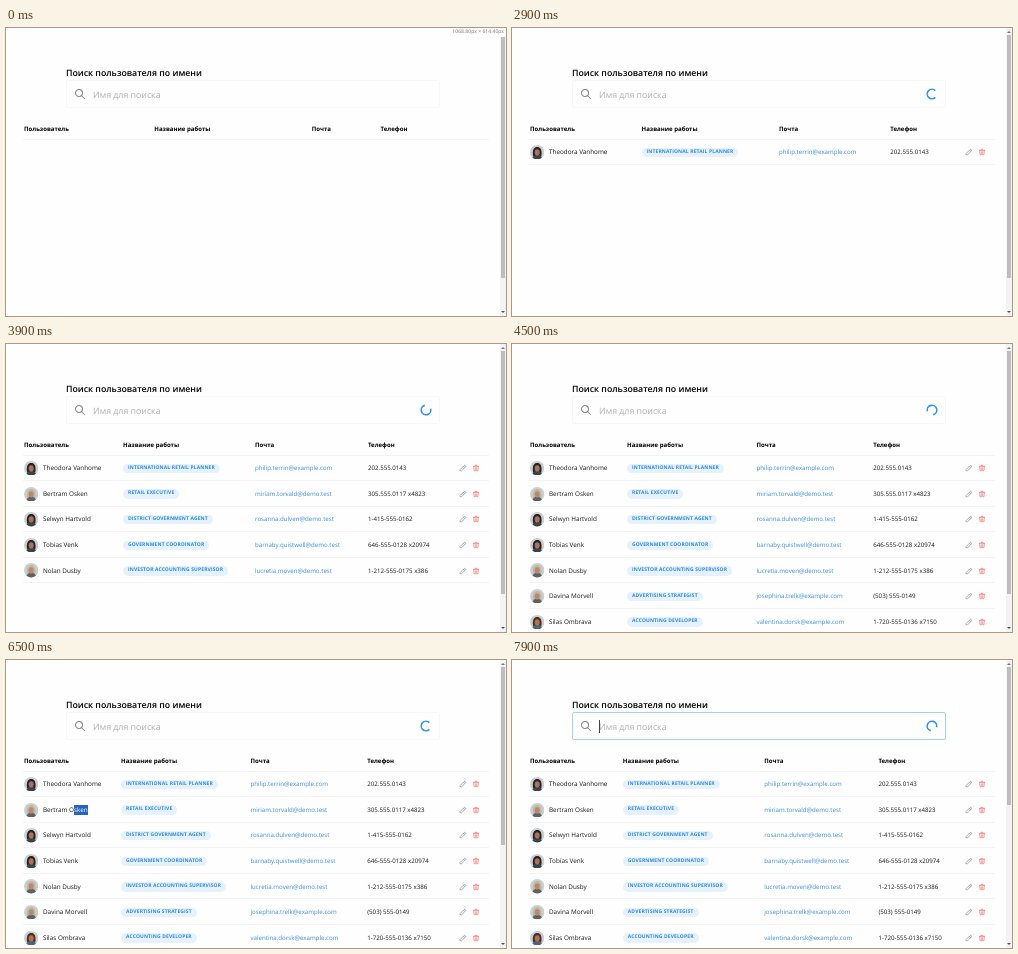
Recreate the animation shown at these times as an HTML page. Size 500 px wide and 288 px high, loop 8 s.

```html
<!DOCTYPE html>
<html lang="ru">
<head>
<meta charset="utf-8">
<title>Поиск пользователя</title>
<style>
  html, body { margin: 0; width: 100%; height: 100%; overflow: hidden; background: #fefefe; }
  #stage {
    position: relative; width: 500px; height: 288px; overflow: hidden;
    font: 6.15px/10px "Open Sans", "Noto Sans", sans-serif;
    color: #15181b; text-rendering: geometricPrecision; white-space: nowrap;
  }
  #stage div, #stage svg, .cell { position: absolute; box-sizing: border-box; }
  svg { fill: none; stroke-linecap: round; stroke-linejoin: round; }

  #title { left: 60px; top: 38px; font-size: 8.77px; line-height: 14px; font-weight: 600; color: #000; }
  #field { left: 60px; top: 52px; width: 374px; height: 28px; border: 1px solid #f6f7f8; border-radius: 2px; }
  #field.focus { border-color: #a5d2f2; }
  #hint { left: 87px; top: 59.5px; font-size: 8.8px; line-height: 14px; color: #afb1b4; }
  #caret { left: 87px; top: 60px; width: 1px; height: 13px; background: #444; }
  #search { left: 67.5px; top: 60px; width: 12px; height: 12px; stroke: #868a8e; stroke-width: 2.1; }
  #spinner { left: 414px; top: 60px; width: 12px; height: 12px; stroke: #2f92e8; stroke-width: 1.6; stroke-linecap: butt; }

  #table { left: 0; top: 0; }
  .row { left: 17px; width: 466px; height: 25.6px; border-bottom: 1px solid #f3f3f5; }
  .row .cell { top: 7.8px; }
  .head { top: 95.5px; height: 16px; font-weight: 700; font-size: 6.05px; color: #000; }
  .head .cell { top: 0; }
  .user { left: 1px; }
  .job { left: calc(var(--job) - 17px); }
  .mail { left: calc(var(--mail) - 17px); }
  .phone { left: calc(var(--phone) - 17px); }
  .body .user { left: 20px; font-weight: 500; font-size: 6.35px; }
  .body .mail { color: #3b8fdc; }
  .body .job {
    top: 8.4px; padding: 0 5px; border-radius: 5px; background: #e5f2fd; color: #2f8ae0;
    font-size: 5px; line-height: 9.5px; font-weight: 700; letter-spacing: .12px;
  }
  .avatar { left: .8px; top: 5.6px; width: 14.4px; height: 14.4px; }
  .pen, .bin { top: 8.8px; width: 8px; height: 8px; stroke-width: 2; }
  .pen { left: 435.5px; stroke: #868e96; }
  .bin { left: 448.5px; stroke: #f4726f; }
  mark { display: inline-block; background: #2563c4; color: #fff; line-height: 10px; }

  #track { left: 494px; top: 0; width: 6px; height: 288px; background: #f3f3f3; }
  #thumb { left: .7px; top: 7px; width: 4.6px; background: #bdbdbd; }
  .arrow { left: 1.4px; border: 2px solid transparent; }
  .up { top: 1px; border-bottom-color: #777 !important; }
  .down { bottom: 1px; border-top-color: #555 !important; }
  #size {
    right: 0; top: 0; width: 55px; height: 9px; padding-right: 2px; background: #fefefe;
    font-size: 5.1px; line-height: 9px; text-align: right; color: #777;
  }
</style>
</head>
<body>
<div id="stage">
  <div id="title">Поиск пользователя по имени</div>
  <div id="field"></div>
  <svg id="search" viewBox="0 0 24 24"><circle cx="10" cy="10" r="7"/><path d="M21 21l-6-6"/></svg>
  <div id="hint">Имя для поиска</div>
  <div id="caret"></div>
  <svg id="spinner" viewBox="-6 -6 12 12"><path d="M-3.400 -3.400A4.800 4.800 0 1 1 -3.400 3.400"/></svg>
  <div id="table">
    <div class="row head">
      <span class="cell user">Пользователь</span><span class="cell job">Название работы</span>
      <span class="cell mail">Почта</span><span class="cell phone">Телефон</span>
    </div>
  </div>
  <div id="track"><div class="arrow up"></div><div id="thumb"></div><div class="arrow down"></div></div>
  <div id="size">1068.80px × 614.40px</div>
</div>
<script>
const LOOP = 8000, TICK = 100;
const SPIN_START = 2300, SPIN_PERIOD = 1200;
const FIRST_ROW = 2700, ROW_PERIOD = 300;
const TABLE_TOP = 111.4, ROW_HEIGHT = 25.6;
const VIEW_HEIGHT = 288, MIN_PAGE_HEIGHT = 325, TRACK_LENGTH = 274;
const $ = id => document.getElementById(id);

const users = [
  ["Theodora Vanhome", "International Retail Planner", "philip.terrin@example.com", "202.555.0143"],
  ["Bertram Osken", "Retail Executive", "miriam.torvald@demo.test", "305.555.0117 x4823"],
  ["Selwyn Hartvold", "District Government Agent", "rosanna.dulven@demo.test", "1-415-555-0162"],
  ["Tobias Venk", "Government Coordinator", "barnaby.quistwell@demo.test", "646-555-0128 x20974"],
  ["Nolan Dusby", "Investor Accounting Supervisor", "lucretia.moven@demo.test", "1-212-555-0175 x386"],
  ["Davina Morvell", "Advertising Strategist", "josephina.trelk@example.com", "(503) 555-0149"],
  ["Silas Ombrava", "Accounting Developer", "valentina.dorsk@example.com", "1-720-555-0136 x7150"]
];

// Hair, skin and clothes of each silhouette
const dark = ["#2a2224", "#a9745c", "#39424c"];
const fair = ["#c3b79f", "#b58a70", "#5d6166"];
const looks = [dark, fair, dark, dark, fair, fair, ["#4a322a", "#b5704f", "#4c6478"]];

// [row count, job, mail, phone]: the columns shift as longer values arrive
const columns = [
  [0, 148.3, 305.8, 374.6], [1, 129.5, 267, 378.3], [2, 121, 255, 366],
  [3, 120, 253, 367], [4, 118.5, 248, 362], [5, 117, 249, 362],
  [6, 116, 246, 363], [7, 115, 244.5, 361.3], [16, 110.8, 252.3, 366.4]
];

const within = (t, from, to) => t >= from && t < to;
const show = (el, on) => { el.style.visibility = on ? "visible" : "hidden"; };

const avatar = ([hair, skin, clothes]) => `
  <svg class="avatar" viewBox="0 0 28 28">
    <circle cx="14" cy="14" r="14" fill="#c9d0d3"/>
    <path d="M6 22C4 9 8 4 14 4s10 5 8 18z" fill="${hair}"/>
    <path d="M5 25q2-6 9-6t9 6q-9 6-18 0z" fill="${clothes}"/>
    <ellipse cx="14" cy="14.5" rx="4.8" ry="6" fill="${skin}"/>
  </svg>`;
const pen = `<svg class="pen" viewBox="0 0 24 24">
  <path d="M4 20h4L19 9a2.8 2.8 0 0 0-4-4L4 16zM13.500 6.500l4 4"/></svg>`;
const bin = `<svg class="bin" viewBox="0 0 24 24">
  <path d="M4 7h16M10 11v6M14 11v6M5 7l1 13h12l1-13M9 7V4h6v3"/></svg>`;

const rows = users.map(([name, job, mail, phone], i) => {
  const row = document.createElement("div");
  row.className = "row body";
  row.style.top = TABLE_TOP + i * ROW_HEIGHT + "px";
  row.innerHTML = avatar(looks[i]) +
    `<span class="cell user">${name}</span><span class="cell job">${job.toUpperCase()}</span>` +
    `<span class="cell mail">${mail}</span><span class="cell phone">${phone}</span>` + pen + bin;
  $("table").append(row);
  return row;
});

const selectable = rows[1].querySelector(".user");
let selected = 0;
function select(count) {
  if (count === selected) return;
  selected = count;
  const name = users[1][0], cut = name.length - count;
  selectable.innerHTML = name.slice(0, cut) + (count ? `<mark>${name.slice(cut)}</mark>` : "");
}

function drawTable(count) {
  rows.forEach((row, i) => show(row, i < count));
  const [, job, mail, phone] = columns.filter(([from]) => from <= count).pop();
  $("table").style.cssText = `--job:${job}px;--mail:${mail}px;--phone:${phone}px`;
  const pageHeight = Math.max(MIN_PAGE_HEIGHT, TABLE_TOP + count * ROW_HEIGHT);
  $("thumb").style.height = TRACK_LENGTH * VIEW_HEIGHT / pageHeight + "px";
}

function draw(now) {
  const t = Math.floor(now % LOOP / TICK) * TICK;

  show($("size"), t < 600);
  $("field").classList.toggle("focus", within(t, 900, SPIN_START) || t >= 7700);
  show($("caret"), within(t, 900, 1400) || within(t, 1900, SPIN_START) || t >= 7700);

  show($("spinner"), t >= SPIN_START);
  $("spinner").style.transform = `rotate(${(t - SPIN_START) / SPIN_PERIOD}turn)`;

  drawTable(Math.max(0, Math.floor((t - FIRST_ROW) / ROW_PERIOD) + 1));
  select(within(t, 6200, 7700) ? Math.min(4, (t - 6100) / TICK) : 0);
  requestAnimationFrame(draw);
}
requestAnimationFrame(draw);
</script>
</body>
</html>
```
